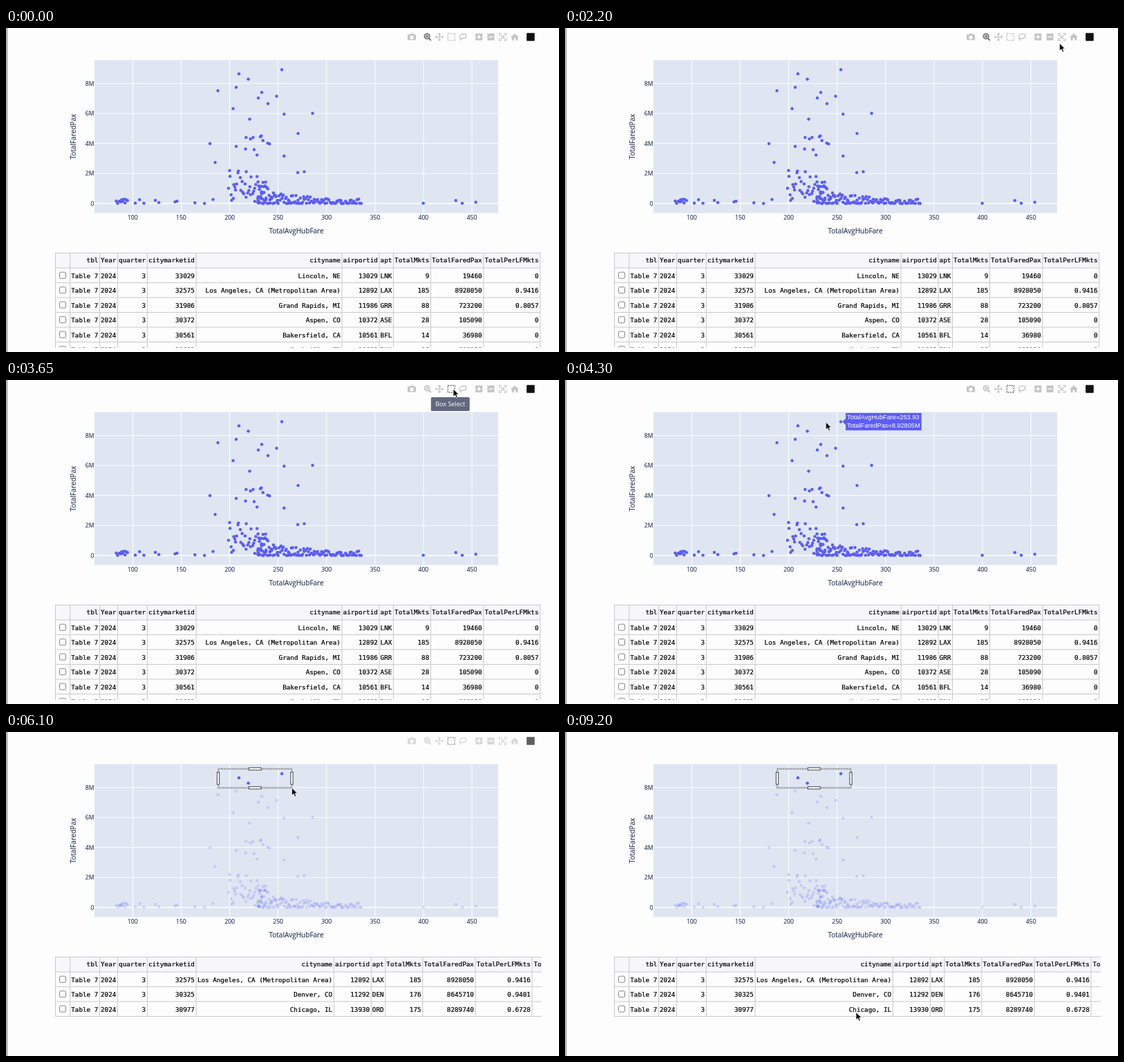
An HTML page for the animation above (9350 ms loop, 800 by 470 pixels).

```html
<!DOCTYPE html>
<html lang="en">
<head>
<meta charset="utf-8">
<title>Scatter selection</title>
<style>
  html, body { margin: 0; width: 100%; height: 100%; overflow: hidden; background: #fdfdfe; }
  svg { display: block; width: 800px; height: 470px; }
  .axis text { font: 8.6px "Open Sans", sans-serif; fill: #2a3b58; stroke: #2a3b58; stroke-width: .15px; }
  .axis .title { font-size: 10px; }
  .table text { font: 9.28px "DejaVu Sans Mono", monospace; fill: #000; stroke: #000; stroke-width: .22px; text-anchor: end; }
  .table .line { fill: #c9c9cc; }
  .icon { opacity: .3; stroke-linejoin: round; }
  .icon.on { opacity: .75; }
  .tip text { font: 9px "Open Sans", sans-serif; fill: #fff; text-anchor: middle; }
  .label text { font: 9.2px "Liberation Sans", Arial, sans-serif; fill: #fff; }
  .handle { fill: #fff; stroke: #444; }
</style>
</head>
<body>
<svg id="stage" viewBox="0 0 800 470" xmlns="http://www.w3.org/2000/svg"></svg>
<script>
const LOOP = 9350;
const BLUE = '#5d5df3';
const stage = document.getElementById('stage');

function add(parent, tag, attrs = {}, text) {
  const node = document.createElementNS('http://www.w3.org/2000/svg', tag);
  set(node, attrs);
  if (text !== undefined) node.textContent = text;
  parent.appendChild(node);
  return node;
}
function set(node, attrs) {
  for (const key in attrs) node.setAttribute(key, attrs[key]);
}
const show = (node, on) => set(node, { visibility: on ? 'visible' : 'hidden' });
const box = (parent, x, y, width, height, fill, more) =>
  add(parent, 'rect', { x, y, width, height, fill, ...more });
const clamp = k => Math.max(0, Math.min(1, k));

// Data (fare, millions of passengers) to pixels
const px = fare => 183.3 + (fare - 100) * 1.402;
const py = pax => 254.5 - pax * 21.74;

// Page edge, plot area and axes
const plot = { left: 128, right: 712, top: 46.5, bottom: 268.5 };
const plotW = plot.right - plot.left, plotH = plot.bottom - plot.top;
box(stage, 0, 0, 2.6, 470, '#b3b1b4');
const axis = add(stage, 'g', { class: 'axis' });
box(axis, plot.left, plot.top, plotW, plotH, '#dfe6f2');
for (let fare = 100; fare <= 450; fare += 50) {
  box(axis, px(fare) - .4, plot.top, .9, plotH, '#fff');
  add(axis, 'text', { x: px(fare), y: 277.8, 'text-anchor': 'middle' }, fare);
}
for (let pax = 0; pax <= 8; pax += 2) {
  const h = pax ? .9 : 1.5;
  box(axis, plot.left, py(pax) - h / 2, plotW, h, '#fff');
  add(axis, 'text', { x: 127.5, y: py(pax) + 3.3, 'text-anchor': 'end' }, pax ? pax + 'M' : 0);
}
const title = (text, transform) => add(axis, 'text', { class: 'title', 'text-anchor': 'middle', transform }, text);
title('TotalAvgHubFare', 'translate(420 297.5)');
title('TotalFaredPax', 'translate(101 157.5) rotate(-90)');

// Markers: the outstanding ones by value, the rest as random clouds
const points = [];
const dots = add(stage, 'g', { fill: BLUE });
function mark(fare, pax) {
  const x = px(fare), y = py(pax);
  points.push({ fare, pax, x, y, dot: add(dots, 'circle', { cx: x, cy: y, r: 2.25 }) });
}
[
  [253.93, 8.92805], [209.6, 8.64571], [219.3, 8.28974], [187.9, 7.52], [206.8, 7.75], [233.2, 7.4], [229.6, 7.04],
  [248.5, 7.15], [239.6, 6.66], [203.6, 6.32], [256.2, 5.96], [285.6, 6.01], [220.7, 5.62], [270.6, 4.67],
  [179.7, 3.99], [206.8, 3.81], [256.2, 3.16], [185, 2.74], [270.3, 2.06], [277, 2.12],
  [399.8, .01], [433.4, .2], [440, .01], [454, .08]
].forEach(([fare, pax]) => mark(fare, pax));

let seed = 11;
const rand = () => (seed = seed * 16807 % 2147483647) / 2147483647;
function cloud(count, fareOf, paxOf) {
  for (let i = 0; i < count; i++) {
    const fare = fareOf((i + rand()) / count);
    mark(fare, paxOf(rand(), fare));
  }
}
cloud(11, u => 83 + 12 * u, v => .35 * v);
cloud(10, u => 101 + 85 * u * u ** .3, v => .4 * v * v);
cloud(11, u => 214 + 28 * u, v => 3.2 + 1.5 * v);
cloud(40, u => 198 + 40 * u, v => .1 + 2.1 * v);
cloud(125, u => 229 + 107 * u ** 1.5, (v, fare) => v * v * (1.1 * Math.exp((229 - fare) / 28) + .3));

// Selection frame with its handles
const frame = add(stage, 'g', { fill: 'none' });
const under = add(frame, 'rect');
const dashes = add(frame, 'rect', { 'stroke-dasharray': '2.4 1.6' });
const handles = [0, 1, 2, 3].map(() => add(frame, 'rect', { class: 'handle' }));
const placeHandle = (i, x, y, width, height) =>
  set(handles[i], { x: x - width / 2, y: y - height / 2, width, height });

// Tables: each column is as wide as its longest text
const CHAR = 5.587, ROW = 21.5, HEAD = 348;
const cols = ['tbl', 'Year', 'quarter', 'citymarketid', 'cityname', 'airportid', 'apt', 'TotalMkts', 'TotalFaredPax', 'TotalPerLFMkts'];
const longest = { tbl: 'Table 7', cityname: 'Los Angeles, CA (Metropolitan Area)' };
const clip = add(add(stage, 'defs'), 'clipPath', { id: 'clip' });
box(clip, 70, 320, 705, 143.4);

function table(rows, cityExtra, nextCol = '') {
  const g = add(stage, 'g', { class: 'table', 'clip-path': 'url(#clip)' });
  const edges = [92.7];
  for (const name of cols) {
    const width = (longest[name] || name).length * CHAR + 3.7;
    edges.push(edges.at(-1) + width + (name === 'cityname' ? cityExtra : 0));
  }
  const right = nextCol ? 776 : edges.at(-1);
  const bottom = HEAD + rows.length * ROW;
  const rowLine = y => box(g, 71, y - .5, right - 71, 1, '', { class: 'line' });
  const put = (cells, y) => cells.forEach((c, i) => add(g, 'text', { x: edges[i + 1] - 2.2, y }, c));
  box(g, 71, 326, right - 71, 22, '#f7f7f9');
  rowLine(326.5);
  rowLine(HEAD);
  put(cols, 340.4);
  rows.forEach((row, i) => {
    const y = HEAD + i * ROW;
    rowLine(y + ROW);
    put(['Table 7', 2024, 3, ...row.split('|')], y + 14.6);
    box(g, 77.5, y + 6.2, 9, 9, '#fff', { rx: 1.8, stroke: '#777', 'stroke-width': .9 });
  });
  for (const x of [71.5, ...edges]) box(g, x - .5, 326, 1, bottom - 326, '', { class: 'line' });
  add(g, 'text', { x: edges.at(-1) + 2.5, y: 340.4, style: 'text-anchor: start' }, nextCol);
  return g;
}
const angeles = '32575|Los Angeles, CA (Metropolitan Area)|12892|LAX|185|8928050|0.9416';
const fullTable = table([
  '33029|Lincoln, NE|13029|LNK|9|19460|0',
  angeles,
  '31986|Grand Rapids, MI|11986|GRR|88|723200|0.8057',
  '30372|Aspen, CO|10372|ASE|28|105090|0',
  '30561|Bakersfield, CA|10561|BFL|14|36980|0',
  '30693|Nashville, TN|10693|BNA|96|980120|0'
], 11.7);
const pickedTable = table([
  angeles,
  '30325|Denver, CO|11292|DEN|176|8645710|0.9401',
  '30977|Chicago, IL|13930|ORD|175|8289740|0.6728'
], 0, 'TotalMkts');

// Toolbar groups: name, path, stroke width (0 = filled), quarter turns, dash
const bar = add(stage, 'g');
const square = 'M-5-5h10v10h-10z';
const groups = [
  [['Download plot as a png', 'M-6-3.5h3l1-1.5h4l1 1.5h3v8h-12zM0-2a2.7 2.7 0 1 0 .01 0z', 0]],
  [
    ['Zoom', 'M3-1a3.7 3.7 0 1 1-7.4 0a3.7 3.7 0 1 1 7.4 0zM2 2l3 3M-2.5-1h3.6M-.7-2.8v3.6', 1.8],
    ['Pan', 'M0 0V-5.2M-1.8-3.5L0-5.3 1.8-3.5', 1.2, 4],
    ['Box Select', square, 1.4, 1, '2 1.33'],
    ['Lasso Select', 'M-4 2C-8-2-1-5 2-4.4S6 1 1 2-4 1-4.6 2.6-2 4-3 5.4', 1.3]
  ],
  [
    ['Zoom in', square + 'M-3-.8h6v1.6h-6zM-.8-3h1.6v2.2h-1.6zM-.8.8h1.6v2.2h-1.6z', 0],
    ['Zoom out', square + 'M-3-.8h6v1.6h-6z', 0],
    ['Autoscale', 'M0 0L3-3M2-5H5V-2', 1.3, 4],
    ['Reset axes', 'M0-5L6 .5H4.3V5h-3V1.6h-2.6V5h-3V.5H-6z', 0]
  ]
];
const slot = (i, group) => 587 + 17.25 * i + 5.5 * group;
const buttons = [];
groups.forEach((group, n) => group.forEach(([name, d, width, turns = 1, dash = 'none']) => {
  const x = slot(buttons.length, n);
  const ink = width
    ? { fill: 'none', stroke: '#444', 'stroke-width': width, 'stroke-dasharray': dash }
    : { fill: '#444', 'fill-rule': 'evenodd' };
  const icon = add(bar, 'g', { class: 'icon', transform: `translate(${x} 13)`, ...ink });
  for (let k = 0; k < turns; k++) add(icon, 'path', { d, transform: `rotate(${90 * k})` });
  buttons.push({ x, name, icon });
}));
box(bar, slot(9, 3) - 5.6, 7.2, 11.6, 11.6, '#111', { rx: 1 });

const tip = add(stage, 'g', { class: 'tip' });
const tipBox = box(tip, 0, 25, 0, 20, '#61687f', { rx: 1.5 });
const tipText = add(tip, 'text', { y: 38.2 });

const label = add(stage, 'g', { class: 'label' });
const labelBox = add(label, 'path', { fill: BLUE, stroke: '#fff', 'stroke-width': .6 });
const lines = [-3, 9].map(y => add(label, 'text', { x: 9, y }));

const cursor = add(stage, 'path', {
  d: 'M0 0V11L2.6 8.7 4.4 12.7 6.3 11.9 4.6 8H8Z', stroke: '#fff', 'stroke-width': .8
});

// Key times and pointer moves (from, until, to x, to y); it rests in between
const SHOWN = 50, CLICK = 3650, DRAG = 4970, DROP = 5900, PICKED = 6000, LEAVE = 7400;
const moves = [
  [SHOWN, 1400, 738, 60], [1400, 2200, 715.5, 22], [2200, 2850, 631, 12.5], [3100, 3400, 647, 13],
  [3850, 4300, 377.5, 61], [4300, 4700, 307, 53.5], [DRAG, 5200, 342.5, 60], [5200, 5700, 413.5, 81],
  [6900, 7700, 424, 378], [7850, 8600, 421, 406.5]
];
function pointer(t) {
  let x = 600, y = 344;
  for (const [from, until, toX, toY] of moves) {
    const k = clamp((t - from) / (until - from));
    x += (toX - x) * k;
    y += (toY - y) * k;
  }
  return { x, y };
}

function drawSelection(t) {
  const lag = 50;
  const active = t > DRAG + lag;
  const done = t >= DROP;
  const start = pointer(DRAG);
  const end = pointer(Math.min(t - lag, DROP));
  const wide = end.y - start.y < 10;
  const [top, bottom] = wide ? [plot.top, plot.bottom] : [start.y, end.y];
  const inside = p => p.x > start.x && p.x < end.x && p.y > top && p.y < bottom;
  for (const p of points) set(p.dot, { opacity: !active || inside(p) ? 1 : .2 });
  show(frame, active);
  if (!active) return;

  const rect = { x: start.x, y: top, width: end.x - start.x, height: bottom - top };
  set(under, { ...rect, stroke: done ? '#c3c7cf' : '#fff', 'stroke-width': done ? 2.6 : 1 });
  set(dashes, { ...rect, stroke: done ? '#98999e' : '#333', 'stroke-width': done ? 1.6 : 1 });
  const midX = (start.x + end.x) / 2;
  const midY = wide ? start.y : (top + bottom) / 2;
  placeHandle(0, start.x - wide, midY, 3.3, 17.5);
  placeHandle(1, end.x + wide, midY, 3.3, 17.5);
  placeHandle(2, midX, top, 18, 3.4);
  placeHandle(3, midX, bottom, 18, 3.4);
  handles.forEach((h, i) => set(h, { display: done || (wide && i < 2) ? 'inline' : 'none' }));
}

function drawToolbar(t, at) {
  const fade = from => clamp((t - from) / 300);
  set(bar, { opacity: 1 - fade(DRAG - 60) + fade(DROP) - fade(LEAVE) });
  const over = t >= SHOWN && Math.abs(at.y - 13) < 7 && buttons.find(b => Math.abs(at.x - b.x) < 8.6);
  const mode = t < CLICK ? 'Zoom' : 'Box Select';
  for (const b of buttons) b.icon.classList.toggle('on', b === over || b.name === mode);
  show(tip, over);
  if (!over) return;
  tipText.textContent = over.name;
  const width = tipText.getComputedTextLength() + 13;
  const mid = over.x - 1.5;
  set(tipText, { x: mid });
  set(tipBox, { x: mid - width / 2, width });
}

// The label belongs to the nearest marker within reach
function drawLabel(t, at) {
  const idle = t >= SHOWN && (t < DRAG - 70 || t > DROP);
  const inPlot = at.x > plot.left && at.x < plot.right && at.y > plot.top && at.y < plot.bottom;
  let near = null, reach = 22;
  if (idle && inPlot) {
    for (const p of points) {
      const d = Math.hypot(p.x - at.x, p.y - at.y);
      if (d < reach) [reach, near] = [d, p];
    }
  }
  show(label, near);
  if (!near) return;
  const amount = near.pax < 1 ? (near.pax * 1000).toFixed(2) + 'k' : near.pax.toFixed(5) + 'M';
  lines[0].textContent = 'TotalAvgHubFare=' + near.fare.toFixed(2);
  lines[1].textContent = 'TotalFaredPax=' + amount;
  const right = 11.5 + Math.max(...lines.map(l => l.getComputedTextLength()));
  set(labelBox, { d: `M1.5 0L6.5-4.5V-13H${right}V13H6.5V4.5Z` });
  set(label, { transform: `translate(${near.x} ${near.y})` });
}

function render(t) {
  const at = pointer(t);
  drawSelection(t);
  drawToolbar(t, at);
  drawLabel(t, at);
  show(fullTable, t < PICKED);
  show(pickedTable, t >= PICKED);
  show(cursor, t >= SHOWN);
  set(cursor, { transform: `translate(${at.x} ${at.y})` });
}

const began = performance.now();
function tick() {
  render((performance.now() - began) % LOOP);
  requestAnimationFrame(tick);
}
tick();
</script>
</body>
</html>
```
